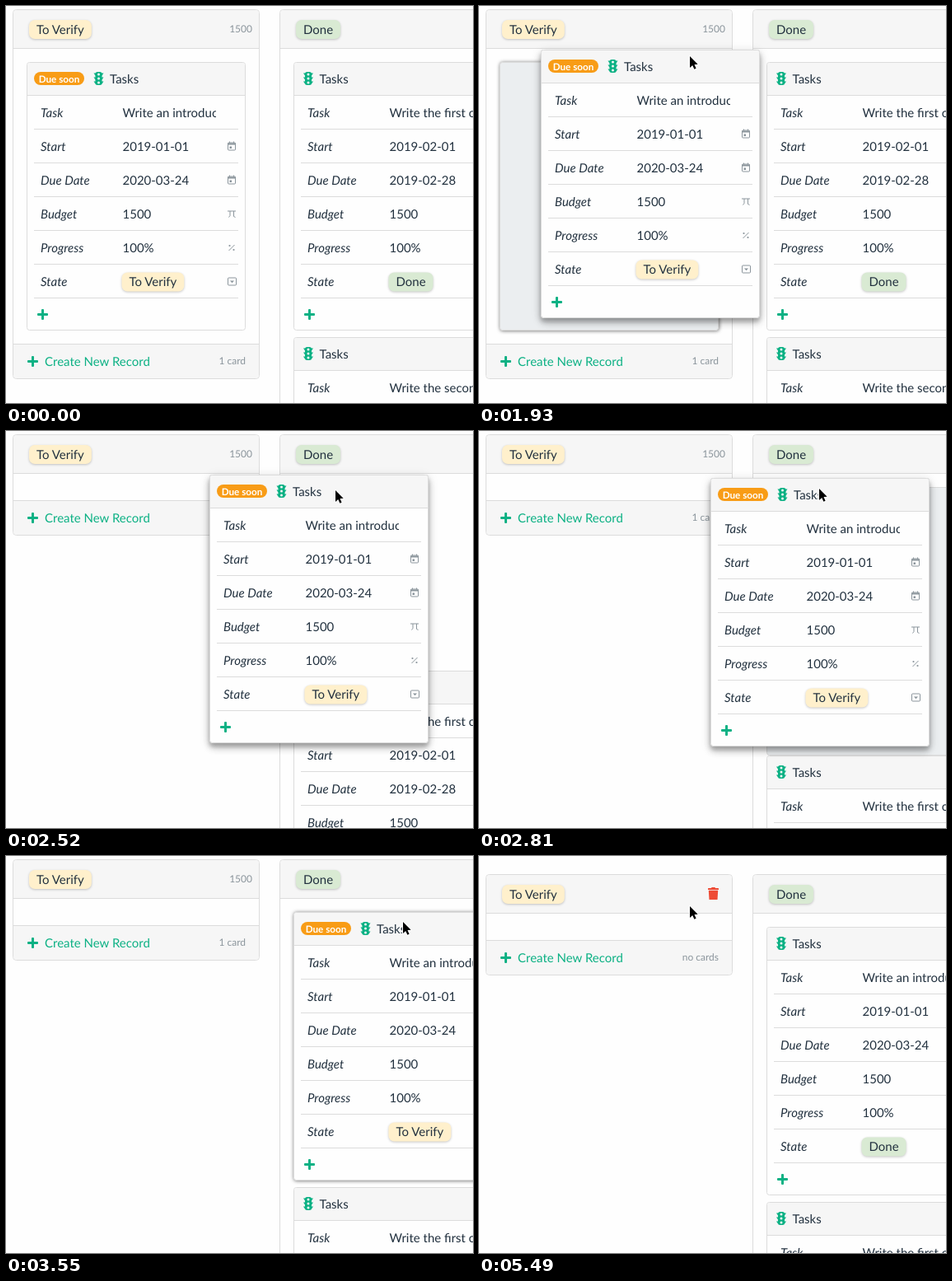
Write an HTML page with a canvas that moves like this. It is 567 px wide and 482 px high and loops after 5630 ms.

```html
<!DOCTYPE html>
<html lang="en">
<head>
<meta charset="utf-8">
<title>Task board</title>
<style>
html, body { margin: 0; width: 100%; height: 100%; overflow: hidden; background: #fefefe; }
canvas { display: block; }
</style>
</head>
<body>
<canvas id="stage" width="567" height="482"></canvas>
<script>
const LOOP = 5630, STEP = 147;
const INK = '#22313f', GREY = '#8b959c', GREEN = '#0cb184', RED = '#ee4b35';
const PAPER = '#fefefe', BAR = '#f6f6f6', LINE = '#dcdcdc', SLOT = '#ebeef0';
const CARD_W = 266, CARD_H = 326, CARD_STEP = 334, ROW = 41;
const CHIPS = { 'To Verify': '#fff0cc', 'Done': '#d9ead3' };
const PICK_UP = 1780, ENTER = 2452, DROP = 3550, SAVE = 3690, LEAVE_FIRST = 4130;

// Spans of time in which the picture moves; it rests between them.
const BURSTS = [[600, 1490], [PICK_UP, 2810], [3110, 3250], [DROP, 4290], [5340, 5490]];

// Key points: [time, x, y]
const CARD_PATH = [[1780, 32, 65], [1927, 75, 53], [2220, 165, 43], [2515, 247, 53],
  [2809, 281, 57], [3110, 336, 64], [3257, 342, 67]];
const CURSOR_PATH = [[1780, 212, 72], [1927, 256, 61], [2515, 400, 72],
  [3110, 427, 67], [3550, 482, 80], [4285, 600, 440]];

const c = document.getElementById('stage').getContext('2d');
c.textRendering = 'geometricPrecision';

const clamp = u => Math.min(1, Math.max(0, u));
const easeOut = u => 1 - (1 - clamp(u)) ** 4;
const lerp = (a, b, u) => a + (b - a) * u;

function heldTime(t) {
  const burst = BURSTS.findLast(([from]) => t >= from);
  if (!burst) return 0;
  const [from, to] = burst;
  return from + Math.floor((Math.min(t, to) - from + 8) / STEP) * STEP;
}

function follow(path, t) {
  const next = Math.max(1, path.findIndex(([time]) => time >= t));
  const a = path[next - 1], b = path[next];
  const u = clamp((t - a[0]) / (b[0] - a[0]));
  return [Math.round(lerp(a[1], b[1], u)), Math.round(lerp(a[2], b[2], u))];
}

function text(str, x, y, { size = 15, color = INK, style = '', align = 'left' } = {}) {
  c.font = `${style} ${size}px Lato, sans-serif`;
  c.fillStyle = color;
  c.textAlign = align;
  c.fillText(str, x, y);
}

function box(x, y, w, h, r, fill, outline) {
  c.beginPath();
  c.roundRect(x, y, w, h, r);
  if (fill) { c.fillStyle = fill; c.fill(); }
  if (outline) { c.strokeStyle = outline; c.lineWidth = 1; c.stroke(); }
}

function rect(x, y, w, h, color) {
  c.fillStyle = color;
  c.fillRect(x, y, w, h);
}

function poly(points, fill, outline) {
  c.beginPath();
  points.forEach(([x, y]) => c.lineTo(x, y));
  c.closePath();
  if (outline) {
    c.lineWidth = 2;
    c.lineJoin = 'round';
    c.strokeStyle = outline;
    c.stroke();
  }
  c.fillStyle = fill;
  c.fill();
}

function stroke(points, color, width = 1) {
  c.beginPath();
  points.forEach(([x, y]) => c.lineTo(x, y));
  c.strokeStyle = color;
  c.lineWidth = width;
  c.stroke();
}

function dot(x, y, r, color) {
  c.beginPath();
  c.arc(x, y, r, 0, 7);
  c.fillStyle = color;
  c.fill();
}

function at(x, y, draw) {
  c.save();
  c.translate(x, y);
  draw();
  c.restore();
}

function shadowed(dx, dy, blur, alpha, draw) {
  c.save();
  c.shadowColor = `rgba(0,0,0,${alpha})`;
  c.shadowOffsetX = dx;
  c.shadowOffsetY = dy;
  c.shadowBlur = blur;
  draw();
  c.restore();
}

function plus(x, y) {
  box(x - 6.5, y - 1.5, 13, 3, 1, GREEN);
  box(x - 1.5, y - 6.5, 3, 13, 1, GREEN);
}

function trafficLight(x, y) {
  at(x, y, () => {
    box(-4, -8, 8, 16, 2.5, GREEN);
    for (const lamp of [-5, 0, 5]) {
      poly([[-6, lamp - 1.5], [6, lamp - 1.5], [4, lamp + 1.5], [-4, lamp + 1.5]], GREEN);
      dot(0, lamp, 1.5, BAR);
    }
  });
}

function trash(x, y) {
  at(x, y, () => {
    box(-6.5, -6.5, 13, 2, 0.5, RED);
    box(-2.5, -7.5, 5, 2, 1, RED);
    poly([[-5.7, -3.7], [5.7, -3.7], [5, 7.5], [-5, 7.5]], RED);
  });
}

function pageSearch(x, y) {
  at(x, y, () => {
    stroke([[-1, 6.5], [-6.5, 6.5], [-6.5, -6.5], [1, -6.5], [4.5, -3], [4.5, -1]], INK, 1.4);
    c.beginPath();
    c.arc(3, 2.5, 2.8, 0, 7);
    c.stroke();
    stroke([[5, 4.5], [8, 7.5]], INK, 1.8);
  });
}

const fieldIcons = {
  calendar() {
    box(-4.5, -4.5, 9, 9, 1, null, GREY);
    rect(-5, -4, 10, 2, GREY);
    for (const ring of [-3, 2]) rect(ring, -6, 1, 2, GREY);
    rect(-2.5, 0, 2.5, 2.5, GREY);
  },
  pi() {
    stroke([[-5, -3.5], [5, -3.5]], GREY);
    stroke([[-2, -3.5], [-2, 2], [-3.5, 4]], GREY);
    stroke([[2.5, -3.5], [2.5, 3], [4.5, 4]], GREY);
  },
  percent() {
    stroke([[-3.5, 3.5], [3.5, -3.5]], GREY);
    for (const side of [-2.5, 2.5]) dot(side, side, 1.1, GREY);
  },
  select() {
    box(-4.5, -4.5, 10, 9, 1, null, GREY);
    poly([[-2, -1], [3, -1], [0.5, 1.8]], GREY);
  }
};

function chip(label, x, y) {
  c.font = '15px Lato, sans-serif';
  const width = c.measureText(label).width + 18;
  shadowed(0, 1, 3, 0.22, () => box(x, y - 11.5, width, 23, 7, CHIPS[label]));
  text(label, x + 9, y + 5);
}

function cardFace(x, y, fill = PAPER) {
  box(x + 0.5, y + 0.5, CARD_W - 1, CARD_H - 1, 3, fill, LINE);
}

function hoverShadow(x, y, strength) {
  shadowed(0.5, 0.5, 4, 0.5 * strength, () => cardFace(x, y));
}

function liftShadow(x, y) {
  shadowed(0, 4, 5, 0.2, () => cardFace(x, y));
  shadowed(0, 6, 10, 0.14, () => cardFace(x, y));
  shadowed(0, 3, 14, 0.14, () => cardFace(x, y));
}

function card(x, y, { task, start, due, state, dueSoon, hover = 0, lifted = false }) {
  if (hover) hoverShadow(x, y, hover);
  if (lifted) liftShadow(x, y);
  cardFace(x, y);
  box(x + 1, y + 1, CARD_W - 2, 39, [3, 3, 0, 0], BAR);
  rect(x, y + 40, CARD_W, 1, LINE);

  if (dueSoon) {
    box(x + 9, y + 12, 61, 16, 8, '#f89c16');
    text('Due soon', x + 39.5, y + 24.5, { size: 11.7, style: 'bold', color: '#fff', align: 'center' });
  }
  const titleX = x + (dueSoon ? 69.5 : 0);
  trafficLight(titleX + 18, y + 20);
  text('Tasks', titleX + 31.5, y + 26);
  if (hover && !dueSoon) {
    c.globalAlpha = hover;
    pageSearch(x + 196, y + 20.5);
    trash(x + 222, y + 20.5);
    c.globalAlpha = 1;
  }

  const fields = [
    ['Task', task], ['Start', start, 'calendar'], ['Due Date', due, 'calendar'],
    ['Budget', '1500', 'pi'], ['Progress', '100%', 'percent'], ['State', state, 'select']
  ];
  fields.forEach(([label, value, icon], i) => {
    const mid = y + 62 + ROW * i;
    text(label, x + 17, mid + 5, { style: 'italic' });
    if (label === 'State') {
      chip(value, x + 115.5, mid);
    } else {
      c.save();
      c.beginPath();
      c.rect(x + 116, mid - 12, 114, 26);
      c.clip();
      text(value, x + 116.5, mid + 5);
      c.restore();
    }
    if (icon) at(x + 249, mid - 0.5, fieldIcons[icon]);
    rect(x + 9, mid + 19, 248, 1, LINE);
  });
  plus(x + 19.5, y + 306.5);
}

// Returns the top of the footer.
function column(x, y, state, bodyHeight) {
  const foot = y + 48 + bodyHeight;
  box(x + 0.5, y + 0.5, 299, bodyHeight + 89, 4, PAPER, LINE);
  box(x + 1, y + 1, 298, 46, [4, 4, 0, 0], BAR);
  rect(x, y + 47, 300, 1, LINE);
  chip(state, x + 20, y + 24.5);
  box(x + 1, foot, 298, 41, [0, 0, 4, 4], BAR);
  rect(x, foot - 1, 300, 1, LINE);
  plus(x + 24.5, foot + 20.5);
  text('Create New Record', x + 39, foot + 25.5, { color: GREEN });
  return foot;
}

function arrowCursor(x, y) {
  at(x, y, () => poly(
    [[0, 0], [0, 14], [3.2, 11], [5.4, 15.8], [7.6, 14.8], [5.5, 10], [9.7, 9.7]], '#000', '#fff'));
}

function moveCursor(x, y) {
  const arm = [[-1, 0], [-1, -4], [-3, -4], [0, -7.5], [3, -4], [1, -4], [1, 0]];
  at(x, y, () => {
    for (const outline of ['#fff', null]) {
      for (let i = 0; i < 4; i++) {
        c.rotate(Math.PI / 2);
        poly(arm, '#000', outline);
      }
    }
  });
}

function drawCursor(t) {
  if (t < 600) return;
  if (t >= PICK_UP) return arrowCursor(...follow(CURSOR_PATH, t));
  const u = easeOut((t - 600) / 882);
  const shape = t >= 890 && t < 1480 ? moveCursor : arrowCursor;
  shape(Math.round(lerp(246, 196, u)), Math.round(lerp(31, 76, u)));
}

function draw(t) {
  const dragging = t >= PICK_UP && t < DROP;
  const entered = t >= ENTER, dropped = t >= DROP, saved = t >= SAVE;
  const top = saved ? 22 : 4;
  const cardsTop = top + 64;

  const intro = {
    task: 'Write an introduction', start: '2019-01-01', due: '2020-03-24',
    state: saved ? 'Done' : 'To Verify', dueSoon: !saved
  };
  const first = { task: 'Write the first chapter', start: '2019-02-01', due: '2019-02-28', state: 'Done' };
  const second = { ...first, task: 'Write the second chapter' };

  rect(0, 0, 567, 482, PAPER);

  const foot = column(8, top, 'To Verify', entered ? 33 : 359);
  const note = { size: 12, color: GREY, align: 'right' };
  if (saved) trash(284.5, top + 23.5);
  else text('1500', 299, top + 28, note);
  text(saved ? 'no cards' : '1 card', 291, foot + 24, note);

  column(332, top, 'Done', 1100);
  const gap = dropped ? CARD_STEP : Math.round(CARD_H * easeOut((t - ENTER) / 252));
  if (dragging && gap === CARD_H) cardFace(349, cardsTop, SLOT);

  const hover = clamp((5480 - t) / 280);
  card(349, cardsTop + gap, { ...first, hover: t >= LEAVE_FIRST ? hover : 0 });
  card(349, cardsTop + gap + CARD_STEP, second);

  if (dropped) {
    card(349, cardsTop, { ...intro, hover: t < LEAVE_FIRST ? 1 : 0 });
  } else if (dragging) {
    if (!entered) {
      hoverShadow(25, cardsTop, 1);
      cardFace(25, cardsTop, SLOT);
    }
    card(...follow(CARD_PATH, t), { ...intro, lifted: true });
  } else {
    card(25, cardsTop, { ...intro, hover: t >= 890 ? 1 : 0 });
  }

  drawCursor(t);
}

function tick() {
  draw(heldTime(performance.now() % LOOP));
  requestAnimationFrame(tick);
}
tick();
</script>
</body>
</html>
```
